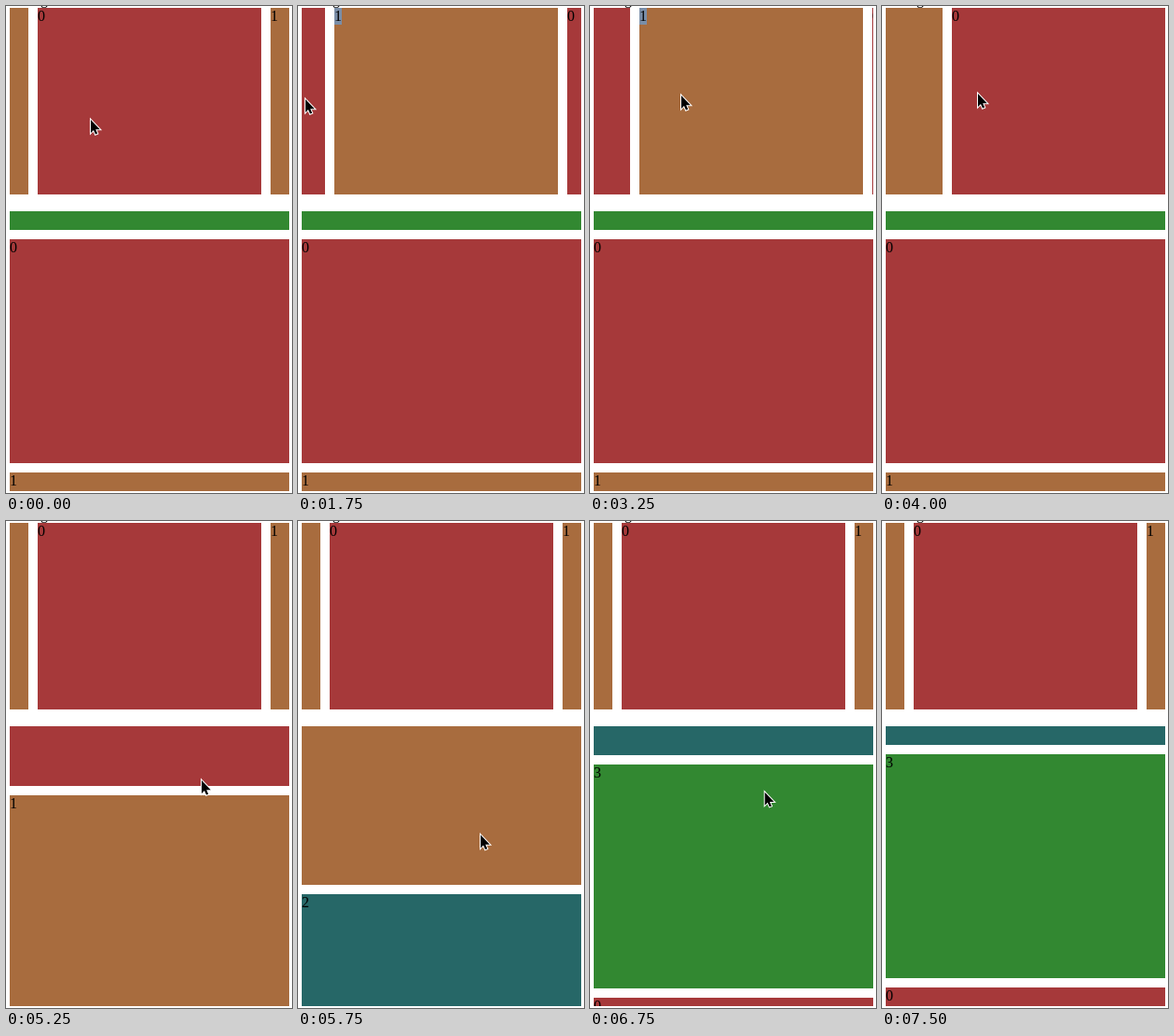
Recreate the animation shown at these times as an HTML page with a canvas. Size 307 by 522 pixels, loop 8 s.

```html
<!DOCTYPE html>
<html lang="en">
<head>
<meta charset="utf-8">
<title>Looping carousels</title>
<style>
html, body { margin: 0; height: 100%; overflow: hidden; background: #fff; }
canvas { display: block; }
</style>
</head>
<body>
<canvas id="stage" width="307" height="522"></canvas>
<script>
const ctx = document.getElementById('stage').getContext('2d');
const LOOP = 8000, STEP = 250, SWIPE = 625;
const SIZE = 240, PITCH = 250, PEEK = 30;
const RED = '#a6393a', BROWN = '#a86c3e', TEAL = '#266767', GREEN = '#328831';
const ARROW = new Path2D('M0 0V14L3 11L5 15.6L7.2 14.7L5.2 10.2H9.8Z');

// Start times of the swipes, in ms
const sideSwipes = [1177, 1950, 2731, 3535];
const downSwipes = [4792, 5480, 6204];

// Places the pointer passes: time, x, y
const stops = [
  [0, 91, 122], [250, 102, 104], [1177, 102, 104], [1750, 8, 100],
  [3250, 98, 96], [4000, 103, 94], [4750, 215, 410], [5250, 210, 278],
  [6250, 182, 395], [6830, 188, 285], [7250, 200, 330]
];

const ease = u => u * u * (3 - 2 * u);
const clamp = u => Math.min(1, Math.max(0, u));

// Each swipe moves the strip on by one item
const scrollAt = (swipes, t) =>
  swipes.reduce((sum, start) => sum + PITCH * ease(clamp((t - start) / SWIPE)), 0);

function pointerAt(t) {
  const i = Math.max(1, stops.findIndex(stop => stop[0] >= t));
  const [t0, x0, y0] = stops[i - 1], [t1, x1, y1] = stops[i];
  const p = ease((t - t0) / (t1 - t0));
  return [x0 + (x1 - x0) * p, y0 + (y1 - y0) * p];
}

function carousel(x, y, w, h, colors, scroll, vertical, selected) {
  ctx.save();
  ctx.beginPath();
  ctx.rect(x, y, w, h);
  ctx.clip();
  const first = Math.floor(scroll / PITCH) - 1;
  for (let i = first; i < first + 4; i++) {
    const n = (i + colors.length) % colors.length;
    const pos = Math.round(PEEK + i * PITCH - scroll);
    const left = vertical ? x : x + pos, top = vertical ? y + pos : y;
    ctx.fillStyle = colors[n];
    ctx.fillRect(left, top, vertical ? w : SIZE, vertical ? SIZE : h);
    if (n === selected) {
      ctx.fillStyle = '#7a8ea8';
      ctx.fillRect(left, top, 8, 18);
    }
    ctx.fillStyle = '#000';
    ctx.fillText(n, left, top + 14);
  }
  ctx.restore();
}

function drawPointer([x, y]) {
  ctx.save();
  ctx.translate(x, y);
  ctx.lineWidth = 2;
  ctx.strokeStyle = '#fff';
  ctx.stroke(ARROW);
  ctx.fillStyle = '#000';
  ctx.fill(ARROW);
  ctx.restore();
}

function draw(now) {
  const t = Math.floor(now % LOOP / STEP) * STEP;
  const selected = t >= 1500 && t <= 3500 ? 1 : -1;
  ctx.fillStyle = '#fff';
  ctx.fillRect(0, 0, 307, 522);
  ctx.font = '16px "Liberation Serif", serif';
  ctx.fillStyle = '#000';
  ctx.fillText('g', 37, -2);
  carousel(4, 2, 300, 200, [RED, BROWN], scrollAt(sideSwipes, t), false, selected);
  carousel(4, 220, 300, 300, [RED, BROWN, TEAL, GREEN], scrollAt(downSwipes, t), true, -1);
  if (t <= 7250) drawPointer(pointerAt(t));
}

const start = performance.now();
function tick() {
  draw(performance.now() - start);
  requestAnimationFrame(tick);
}
tick();
</script>
</body>
</html>
```
